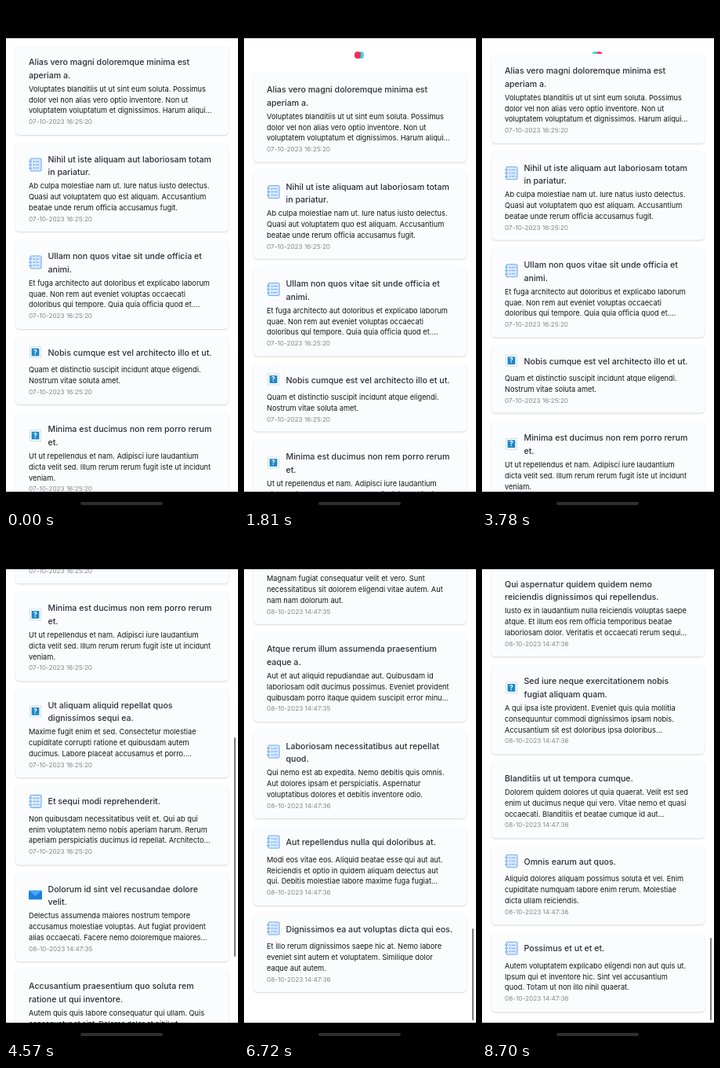
These frames come from a looping animation (296 px wide and 640 px high, 8.78 s). An HTML page:

```html
<!DOCTYPE html>
<html lang="la">
<head>
<meta charset="utf-8">
<style>
html, body { margin: 0; width: 100%; height: 100%; overflow: hidden; background: #000; }
body { position: relative; font-family: Inter, Roboto, sans-serif; }
#view { position: absolute; left: 0; top: 41px; width: 296px; height: 577px; overflow: hidden; background: #fff; }
#list { position: absolute; left: 0; top: -1px; width: 296px; z-index: 2; }
.dot { position: absolute; top: 17px; width: 8.6px; height: 8.6px; border-radius: 50%; }
#red { background: #fb2c54; }
#cyan { background: #2cdcea; }
.card { position: absolute; left: 12px; width: 272px; box-sizing: border-box; padding: 14px 0 0 17px;
  background: #fbfcfd; border-radius: 5px; box-shadow: 0 1px 2px rgba(0, 0, 0, .16); white-space: pre; }
h3 { position: relative; margin: 0 0 1.8px; font-size: 10.62px; line-height: 16.5px; font-weight: 500; color: #2a2d38; }
h3.icon { padding-left: 24.5px; }
h3.icon.one { margin: -1px 0 6.1px; }
h3 svg { position: absolute; left: 0; top: calc(50% - 10.8px); width: 17px; height: 18px; }
p { margin: 0; font-size: 9.26px; line-height: 13.8px; color: #141414; }
time { display: block; margin-top: 1px; font-size: 8.2px; line-height: 12px; color: #85878c; }
#bar { position: absolute; left: 291px; width: 2.4px; border-radius: 2px; background: #7b7b7b; }
#home { position: absolute; left: 95px; top: 631px; width: 105px; height: 4px; border-radius: 2px; background: #2e2e2e; }
</style>
</head>
<body>
<div id="view">
  <div class="dot" id="cyan"></div>
  <div class="dot" id="red"></div>
  <div id="list"></div>
</div>
<div id="bar"></div>
<div id="home"></div>
<script>
const LOOP = 8780, VIEW = 577, GAP = 10;
const $ = id => document.getElementById(id);

const icons = {
  note: `<rect x="2" y="1" width="14" height="16" rx="1.5" fill="#d9e9ff" stroke="#6eaaf7" stroke-width="1.1"/>
    <path d="M0 4.5H4M0 9H4M0 13.5H4M8.5 5H13.5M8.5 9H13.5M8.5 13H13.5" stroke="#6eaaf7"/>
    <path d="M6 5H7.3M6 9H7.3M6 13H7.3" stroke="#4a8ff0" stroke-width="1.3"/>`,
  help: `<rect x="1.5" y="2.5" width="14" height="14" fill="#fff" stroke="#cfdbe4" stroke-width=".9"/>
    <rect x="3.6" y="4.6" width="9.8" height="9.8" fill="#1c88c8"/>
    <text x="8.5" y="12.5" font-size="8.5" font-weight="700" fill="#fff" text-anchor="middle">?</text>`,
  mail: `<rect y="3.5" width="17" height="11.5" rx="1.2" fill="#1b7fdc"/>
    <path d="M.3 4Q.6 3.5 1.2 3.5H15.8Q16.4 3.5 16.7 4L8.5 10.5Z" fill="#41a6f5"/>`
};
const dates = ["07-10-2023 16:25:20", "08-10-2023 14:47:35", "08-10-2023 14:47:36"];

// icon, title, body, date index; "|" breaks a line
const items = [
  ["", "Alias vero magni doloremque minima est|aperiam a.", "Voluptates blanditiis ut ut sint eum soluta. Possimus|dolor vel non alias vero optio inventore. Non ut|voluptatem voluptatum et dignissimos. Harum aliqui…", 0],
  ["note", "Nihil ut iste aliquam aut laboriosam totam|in pariatur.", "Ab culpa molestiae nam ut. Iure natus iusto delectus.|Quasi aut voluptatem quo est aliquam. Accusantium|beatae unde rerum officia accusamus fugit.", 0],
  ["note", "Ullam non quos vitae sit unde officia et|animi.", "Et fuga architecto aut doloribus et explicabo laborum|quae. Non rem aut eveniet voluptas occaecati|doloribus qui tempore. Quia quia officia quod et.…", 0],
  ["help", "Nobis cumque est vel architecto illo et ut.", "Quam et distinctio suscipit incidunt atque eligendi.|Nostrum vitae soluta amet.", 0],
  ["help", "Minima est ducimus non rem porro rerum|et.", "Ut ut repellendus et nam. Adipisci iure laudantium|dicta velit sed. Illum rerum rerum fugit iste ut incidunt|veniam.", 0],
  ["help", "Ut aliquam aliquid repellat quos|dignissimos sequi ea.", "Maxime fugit enim et sed. Consectetur molestiae|cupiditate corrupti ratione et quibusdam autem|ducimus. Labore placeat accusamus et porro.…", 0],
  ["note", "Et sequi modi reprehenderit.", "Non quibusdam necessitatibus velit et. Qui ab qui|enim voluptatem nemo nobis aperiam harum. Rerum|aperiam perspiciatis ducimus id repellat. Architecto…", 0],
  ["mail", "Dolorum id sint vel recusandae dolore|velit.", "Delectus assumenda maiores nostrum tempore|accusamus molestiae voluptas. Aut fugiat provident|alias occaecati. Facere nemo doloremque maiores…", 1],
  ["", "Accusantium praesentium quo soluta rem|ratione ut qui inventore.", "Autem quis quis labore consequatur qui ullam. Quis|consequatur at sint. Dolores dolor et nihil ut|quaerat. Odio dolorem vel quia sit.", 1],
  ["", "Est blanditiis vel rerum consequatur.", "Aut aliquam dolor ullam atque debitis mollitia cum. Ea|et ducimus impedit consequatur numquam quasi.|Sed iure odio reprehenderit eveniet consequatur et…", 1],
  ["", "Perspiciatis molestias dolores facilis non sint.", "Blanditiis doloribus vero aut dignissimos quo.|Architecto et et aspernatur aut ratione. Voluptas|debitis inventore at quisquam deserunt.", 1],
  ["", "Molestiae iure aliquam aut accusantium illo|est.", "Magnam ut officia explicabo aliquid aperiam quia|alias. Quasi deserunt impedit eligendi dolor|necessitatibus debitis officiis. Reprehenderit alias…", 1],
  ["", "Dolor ut at veritatis est quis adipisci.", "Soluta natus voluptatem mollitia qui delectus natus.|Et mollitia quos adipisci qui. Modi facere voluptas|fugiat quia. Illum rerum magnam illo eligendi et quia.", 1],
  ["", "Quos quo deserunt est eligendi inventore|similique voluptates.", "Sapiente quisquam sint minus itaque cum cupiditate|eaque. Cumque maiores sit dolor doloremque sint|eligendi. Sed hic esse officiis sint voluptate nihil…", 1],
  ["", "Eum nesciunt tempora dolorem ut quia|nostrum sit.", "Quia et harum voluptas quidem. Ipsam rerum|nihil aut dolorem eos. Sunt vero minus quis|laborum et omnis.", 1],
  ["", "Sint dolor vero harum enim.", "Magnam fugiat consequatur velit et vero. Sunt|necessitatibus sit dolorem eligendi vitae autem. Aut|nam nam dolorum aut.", 1],
  ["", "Atque rerum illum assumenda praesentium|eaque a.", "Aut et aut aliquid repudiandae aut. Quibusdam id|laboriosam odit ducimus possimus. Eveniet provident|quibusdam porro itaque quidem suscipit error minu…", 1],
  ["note", "Laboriosam necessitatibus aut repellat|quod.", "Qui nemo est ab expedita. Nemo debitis quis omnis.|Aut dolores ipsam et perspiciatis. Aspernatur|voluptatibus dolores et debitis inventore odio.", 2],
  ["note", "Aut repellendus nulla qui doloribus at.", "Modi eos vitae eos. Aliquid beatae esse qui aut aut.|Reiciendis et optio in quidem aliquam delectus aut|qui. Debitis molestiae labore maxime fuga fugiat…", 2],
  ["note", "Dignissimos ea aut voluptas dicta qui eos.", "Et illo rerum dignissimos saepe hic at. Nemo labore|eveniet sint autem et voluptatem. Similique dolor|eaque aut autem.", 2],
  ["", "Natus omnis quia et fuga tenetur.", "Rerum sit velit aut nobis. Dolor ipsum quia|voluptas et harum. Ea quasi vero totam sint|minima et quo.", 2],
  ["", "Veniam quaerat ut ipsam dolores illum|et nihil.", "Fuga et voluptate odit. Sit quidem rerum aut|laborum nisi. Numquam et iusto dolor omnis|tempora sed.", 2],
  ["", "Qui aspernatur quidem quidem nemo|reiciendis dignissimos qui repellendus.", "Iusto ex in laudantium nulla reiciendis voluptas saepe|atque. Et illum eos rem officia temporibus beatae|laboriosam dolor. Veritatis et occaecati rerum sequi…", 2],
  ["help", "Sed iure neque exercitationem nobis|fugiat aliquam quam.", "A qui ipsa iste provident. Eveniet quis quia mollitia|consequuntur commodi dignissimos ipsam nobis.|Accusantium sit est doloribus ipsa doloribus…", 2],
  ["", "Blanditiis ut ut tempora cumque.", "Dolorem quidem dolores ut quia quaerat. Velit est sed|enim ut ducimus neque qui vero. Vitae nemo et quasi|occaecati. Blanditiis et beatae cumque id aut…", 2],
  ["note", "Omnis earum aut quos.", "Aliquid dolores aliquam possimus soluta et vel. Enim|cupiditate numquam labore enim rerum. Molestiae|dicta ullam reiciendis.", 2],
  ["note", "Possimus et ut et et.", "Autem voluptatem explicabo eligendi non aut quis ut.|Ipsum qui et inventore hic. Sint vel accusantium|quod. Totam ut non illo nihil quaerat.", 2]
];
// icons and titles of the first cards while refreshing
const fresh = [
  ["help", items[0][1]],
  ["", "Nihil ut iste aliquam aut laboriosam totam in|pariatur."],
  ["help", items[2][1]],
  ["help", items[3][1]],
  ["", "Minima est ducimus non rem porro rerum et."]
];

const lines = s => s.split("|").length;
const breaks = s => s.replaceAll("|", "\n");

function addCard([icon, title, body, date], top) {
  const one = lines(title) === 1;
  const height = 39.1 + 16.5 * lines(title) + 13.8 * lines(body) + (icon && one ? 3.5 : 0);
  const el = document.createElement("div");
  el.className = "card";
  el.style.cssText = `top:${top}px;height:${height}px`;
  el.innerHTML = `<h3 class="${icon ? "icon" : ""} ${one ? "one" : ""}">` +
    (icon ? `<svg viewBox="0 0 17 18">${icons[icon]}</svg>` : "") +
    `${breaks(title)}</h3><p>${breaks(body)}</p><time>${dates[date]}</time>`;
  $("list").append(el);
  return { el, top, bottom: top + height };
}

let y = 10;
const cards = items.map(item => {
  const card = addCard(item, y);
  y = card.bottom + GAP;
  return card;
});
const freshCards = fresh.map((f, i) => addCard([...f, ...items[i].slice(2)], cards[i].top));

const pageHeight = n => cards[n - 1].bottom + 13;
const pageEnd = n => pageHeight(n) - VIEW;
const end1 = pageEnd(10), end2 = pageEnd(20), end3 = pageEnd(27);

// time, scroll offset
const keys = [
  [0, 0], [1100, 0], [1260, -18], [1480, -52], [1810, -34.5],
  [3480, -34.5], [3700, -15], [4100, 0],
  [4300, 0], [4440, 160], [4570, 446.5], [4720, 565], [5000, end1],
  [5380, end1], [5520, 700], [5640, 890], [5760, 1068.5], [5950, 1290], [6220, 1400],
  [6460, 1400], [6600, 1600], [6720, end2 + 24.5], [6820, end2 + 37], [7100, end2 + 8], [7480, end2],
  [7650, end2], [7850, 1990], [8100, 2380], [8350, 2525], [8700, end3], [LOOP, end3]
];
const slope = i => (keys[i + 1][1] - keys[i][1]) / (keys[i + 1][0] - keys[i][0]);
function tangent(i) {
  if (i === 0 || i === keys.length - 1) return 0;
  const a = slope(i - 1), b = slope(i);
  return a * b <= 0 ? 0 : 2 * a * b / (a + b);
}
// monotone cubic through the keys
function scrollAt(t) {
  const i = Math.max(0, keys.findIndex(k => k[0] > t) - 1);
  const [t0, a] = keys[i], [t1, b] = keys[i + 1];
  const d = t1 - t0, u = (t - t0) / d, v = 1 - u;
  return v * v * (1 + 2 * u) * a + u * u * (3 - 2 * u) * b +
    d * u * v * (v * tangent(i) - u * tangent(i + 1));
}

// the spinner stalls twice while the list renders
const stall = (t, from, to) => Math.min(Math.max(t - from, 0), to - from);
function drawDots(t) {
  const run = t - stall(t, 1810, 1990) - stall(t, 2330, 2870);
  const phase = Math.PI / 2 + (run - 2150) * 2 * Math.PI / 1047;
  const shift = 4 * Math.sin(phase);
  const shown = t > 1150 && t < 4100 ? "" : "none";
  for (const [id, x] of [["red", shift], ["cyan", -shift]]) {
    $(id).style.left = 142.7 + x + "px";
    $(id).style.display = shown;
  }
  $("red").style.zIndex = Math.cos(phase) >= 0 ? 1 : 0;
}

function drawBar(t, scroll, count) {
  const total = pageHeight(count), over = Math.max(0, scroll - pageEnd(count));
  const length = VIEW * VIEW / total - over;
  const top = over ? 615 - length : 38 + scroll / total * VIEW;
  $("bar").style.cssText = `top:${Math.max(42, top)}px;height:${length}px;display:${t < 4330 ? "none" : "block"}`;
}

function draw() {
  const t = performance.now() % LOOP;
  const scroll = scrollAt(t);
  const count = t < 5000 ? 10 : t < 7400 ? 20 : 27;
  const refreshing = t >= 1990 && t < 3480;
  $("list").style.transform = `translateY(${-scroll}px)`;
  cards.forEach((c, i) => {
    c.el.style.display = i >= count || refreshing && i < fresh.length ? "none" : "";
  });
  freshCards.forEach(c => c.el.style.display = refreshing ? "" : "none");
  drawDots(t);
  drawBar(t, scroll, count);
  requestAnimationFrame(draw);
}
draw();
</script>
</body>
</html>
```
